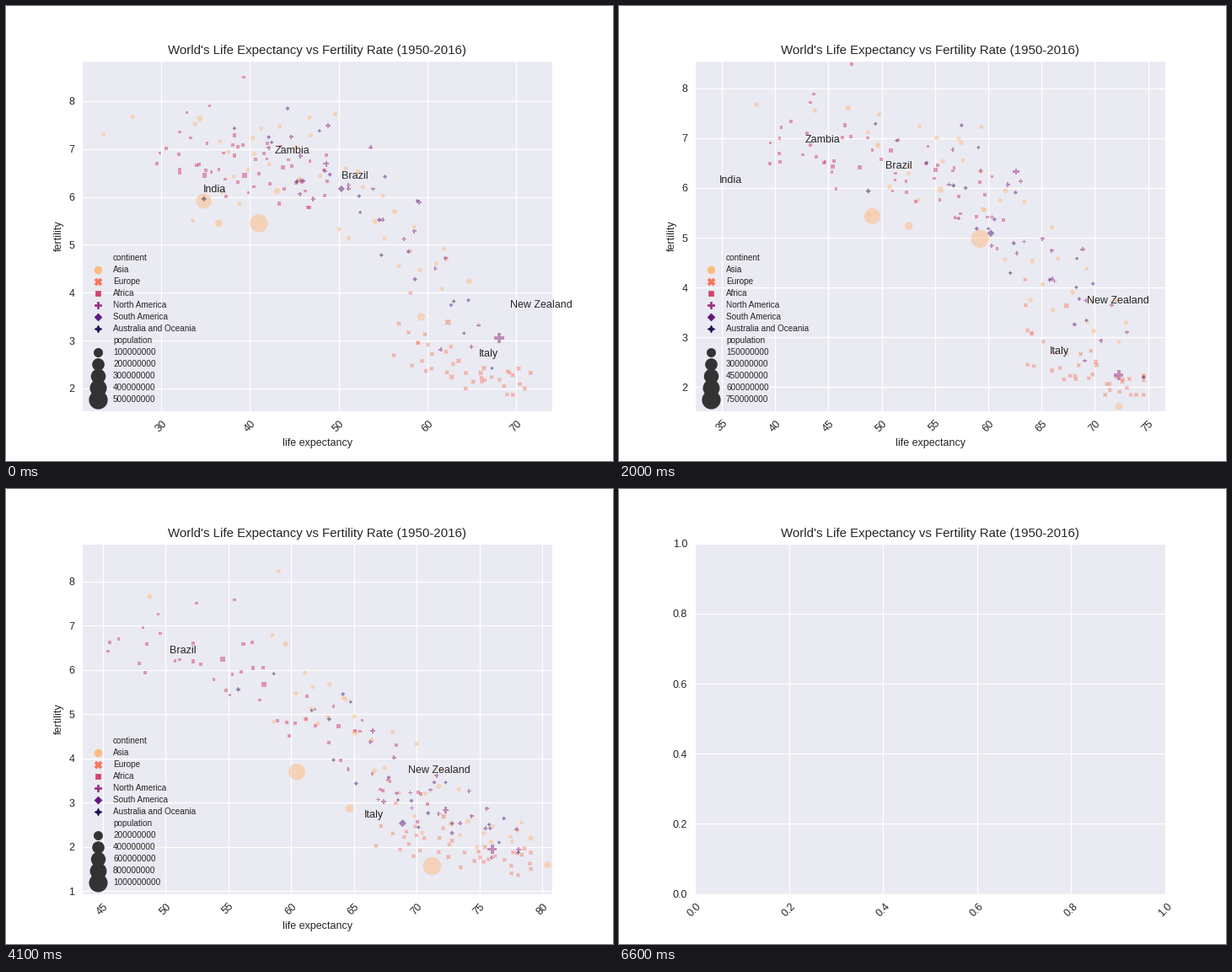
Recreate the animation shown at these times as a matplotlib script. Size 720 px wide and 540 px high, loop 6.7 s.

```python
import numpy as np
import matplotlib.pyplot as plt
from matplotlib.animation import FuncAnimation

plt.rcParams.update({
    "font.family": "Liberation Sans", "font.size": 10,
    "text.color": ".15", "axes.labelcolor": ".15",
    "xtick.color": ".15", "ytick.color": ".15",
    "axes.facecolor": "#EAEAF2", "axes.edgecolor": "white",
    "axes.linewidth": 1, "axes.grid": True, "axes.axisbelow": True,
    "grid.color": "white", "grid.linewidth": 1,
    "xtick.major.size": 0, "ytick.major.size": 0,
    "xtick.major.pad": 7, "ytick.major.pad": 7,
    "legend.frameon": False, "legend.labelspacing": 0.4,
})

FRAMES = 67  # one per year from 1950
LAST = FRAMES - 2

# view limits at a few key years
KEYS = [0, 12, 20, 31, 41, 55, 65]
X0 = [21.07, 27.93, 32.47, 36.03, 43.74, 40.53, 46.5]
X1 = [74.07, 76.03, 76.62, 78.58, 80.80, 83.93, 85.6]
Y0 = [1.53, 1.545, 1.525, 1.065, 0.94, 0.88, 0.95]
Y1 = [8.845, 8.52, 8.553, 9.50, 8.86, 7.946, 7.95]

LABELS = [("India", 34.75, 6.10), ("Zambia", 42.8, 6.91),
          ("Brazil", 50.35, 6.38), ("Italy", 65.8, 2.66),
          ("New Zealand", 69.3, 3.68)]

rng = np.random.default_rng(16)


def drop(x, mid, width):
    """Smooth fall from 1 to 0 around mid."""
    return 1 / (1 + np.exp((x - mid) / width))


def gain(t, bend):
    """Progress from 0 to 1, fast at first."""
    return 1 - (1 - t / LAST) ** bend


class Country:
    """A large or outlying country; shock = (year, width, life, fertility)."""

    def __init__(self, pop, life, fert, mid, width, bend=1.7,
                 shock=(0, 1, 0, 0)):
        self.pop, self.life, self.fert = pop, life, fert
        self.mid, self.width, self.bend = mid, width, bend
        self.shock = shock

    def state(self, t):
        (l0, l1), (f0, f1) = self.life, self.fert
        year, width, dlife, dfert = self.shock
        pulse = np.exp(-((t - year) / width) ** 2)
        x = l0 + (l1 - l0) * gain(t, self.bend) + dlife * pulse
        y = f1 + (f0 - f1) * drop(t, self.mid, self.width) + dfert * pulse
        return x, y, self.pop[0] + self.pop[1] * t


class Region:
    """Small countries whose fertility falls as life expectancy grows."""

    def __init__(self, name, marker, n, start, end, growth=0.02, shift=0,
                 bend=1.7, big=()):
        self.name, self.marker = name, marker
        rank = (np.arange(n) + rng.random(n)) / n
        self.start = np.interp(rank, [0, 1], start)
        self.end = np.interp(rank, [0, 1], end)
        self.shift = shift + 2 * rng.normal(size=n)
        self.z = np.clip(rng.normal(size=n), -2, 2)
        self.phase = rng.uniform(0, 2 * np.pi, n)
        self.pop = np.minimum(rng.lognormal(1.5, 1.1, n), 45)
        self.growth, self.bend, self.big = growth, bend, big

    def state(self, t, box):
        x0, x1, y0, y1 = box
        x = self.start + (self.end - self.start) * gain(t, self.bend)
        x = x + np.sin(0.15 * t + self.phase)
        mid = 60 + 6 * min(t / 20, 1) + self.shift
        stage = drop(x, mid, 3.5 + 0.04 * t)
        low, high = 2.2 - 0.013 * t, 6.7 - 0.03 * max(t - 35, 0)
        y = low + (high - low) * stage + self.z * (0.18 + 0.42 * stage)

        mx, my = 0.046 * (x1 - x0), 0.046 * (y1 - y0)
        small = (np.clip(x, x0 + mx, x1 - mx), np.clip(y, y0 + my, y1 - my),
                 self.pop * (1 + self.growth * t))
        if not self.big:
            return small
        big = np.transpose([c.state(t) for c in self.big])
        return np.hstack([small, big])


china = Country((554, 14.2), (41, 76), (5.45, 1.5), 27, 3.5, 2,
                (10.8, 1.5, -17, 0))
india = Country((376, 13.9), (34.8, 67), (6.0, 2), 38, 10, 1.6)
indonesia = Country((70, 2.8), (36.5, 71), (5.45, 2.35), 33, 5)
japan = Country((83, 0.8), (59.3, 83.4), (3.75, 1.6), 6, 3, 2.1)
afghanistan = Country((8, 0.3), (26.8, 57), (7.67, 4), 60, 3, 1.3)
yemen = Country((4, 0.3), (23.5, 67), (7.3, 3.8), 53, 4, 1.7,
                (34, 10, 0, 1.8))
cambodia = Country((4, 0.2), (40.5, 69), (6.9, 2.7), 45, 6, 1.2,
                   (27.5, 4, -34, 0))
nigeria = Country((38, 1.9), (34.9, 61), (6.45, 5.6), 50, 8, 1.4)
rwanda = Country((2, 0.15), (39.3, 65), (8.5, 3.9), 48, 5, 1,
                 (44, 0.8, -44, 0))
usa = Country((159, 2.5), (68.1, 79), (3.0, 1.95), 18, 2, 1.3,
              (9, 6, 0, 0.5))
mexico = Country((28, 1.5), (48.6, 76.5), (6.7, 2.2), 32, 5, 1.9)
brazil = Country((54, 2.4), (50.3, 75), (6.3, 1.8), 28, 8, 1.4)

REGIONS = [
    Region("Asia", "o", 38, (33, 64), (64, 83), shift=1,
           big=[china, india, indonesia, japan, afghanistan, yemen, cambodia]),
    Region("Europe", "X", 40, (57, 71.5), (71, 82.5), 0.004, -7, 1.4),
    Region("Africa", (4, 0, 45), 51, (30, 49), (49, 76), 0.03,
           big=[nigeria, rwanda]),
    Region("North America", "P", 20, (42, 66), (70, 81),
           big=[usa, mexico]),
    Region("South America", (4, 0, 0), 11, (42, 64), (68, 79), big=[brazil]),
    Region("Australia and Oceania", (4, 1, 0), 11, (35, 69), (61, 82), 0.01),
]
COLORS = [plt.cm.magma(k / 7) for k in range(6, 0, -1)]


def area(pop, top):
    return 15 + 285 * pop / top


def key(ax, label, color="white", marker="o", s=0):
    ax.scatter([], [], s=s, color=[color], marker=marker, label=label,
               linewidths=0.08 * np.sqrt(s))


def add_legend(ax, top):
    key(ax, "continent")
    for region, color in zip(REGIONS, COLORS):
        key(ax, region.name, color, region.marker, 49)
    key(ax, "population")
    step = next(s for s in (100, 150, 200, 250) if s >= top / 6)
    for pop in range(step, int(top) + 1, step):
        key(ax, str(pop * 10**6), ".2", s=area(pop, top))
    ax.legend(loc="lower left", fontsize=8)


fig, ax = plt.subplots(figsize=(8, 6), dpi=90, facecolor="white")


def draw(t):
    ax.clear()
    ax.set_title("World's Life Expectancy vs Fertility Rate (1950-2016)",
                 fontsize=12)
    ax.tick_params(axis="x", rotation=45)
    if t > LAST:  # the final year has no data
        ax.set(xlim=(0, 1), ylim=(0, 1))
        return

    top = china.state(t)[2]
    box = [np.interp(t, KEYS, v) for v in (X0, X1, Y0, Y1)]
    left = box[0]
    for region, color in zip(REGIONS, COLORS):
        x, y, pop = region.state(t, box)
        ax.scatter(x, y, s=area(pop, top), color=[color],
                   marker=region.marker, alpha=0.5, linewidths=0)
        left = min(left, x.min() - 2.1)

    for name, x, y in LABELS:
        ax.annotate(name, (x, y))
    add_legend(ax, top)
    ax.set(xlim=(left, box[1]), ylim=box[2:],
           xlabel="life expectancy", ylabel="fertility")


anim = FuncAnimation(fig, draw, frames=FRAMES, interval=100,
                     init_func=lambda: None, repeat=True, repeat_delay=0)
plt.show()
```
